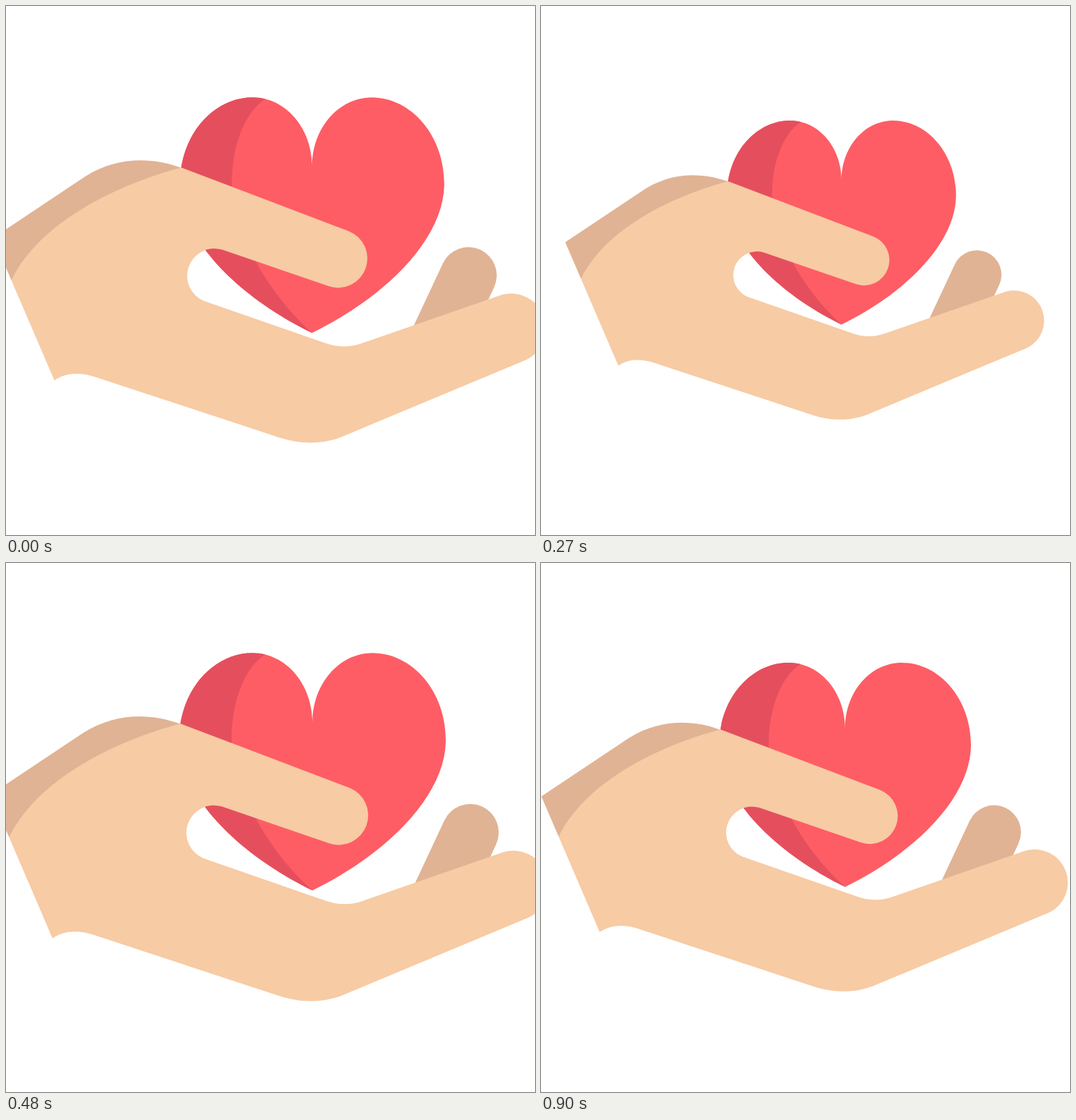
Write an HTML page that moves like this. It is 748 by 748 pixels and loops after 0.93 s.

```html
<!DOCTYPE html>
<html lang="en">
<head>
<meta charset="utf-8">
<title>Beating heart in a hand</title>
<style>
  html, body { margin: 0; width: 100%; height: 100%; overflow: hidden; background: #fff; }
  svg { display: block; width: 100%; height: 100%; }
</style>
</head>
<body>
<svg viewBox="0 0 748 748">
  <g id="icon">
    <!-- heart and its shaded side -->
    <path fill="#fe5d65" d="M430 234C430 182 466 141 510 141C564 141 608 193 608 257C608 330 532 408 430 458
      C328 408 252 330 252 257C252 193 296 141 350 141C394 141 430 182 430 234Z"/>
    <path fill="#e54f5d" d="M367 143C340 160 322 205 322 257C322 308 360 395 430 458
      C328 408 252 330 252 257C252 193 296 141 350 141Q359 141 367 143Z"/>
    <!-- wrist shade and little finger -->
    <path fill="#e0b394" d="M.5 330L125 247C165 222 212 220 254 236L25 387Z
      M567 448L606 364.7A38 38 0 0 1 675.2 396.4L655 440Z"/>
    <!-- palm, thumb and fingers -->
    <path fill="#f7cba4" d="M254 235.4L479.6 321.1A39.5 39.5 0 0 1 452.6 395.3L309 346
      A36.7 36.7 0 0 0 285 415.3L446 471.2C464 478 482 478 500 471L685.7 406.6
      A47 47 0 0 1 719 494L470 598C443 608.5 413 608 386 599L137 517C118 511 98 511 83 522L25 387
      C70 295 200 249 254 235.4Z"/>
  </g>
</svg>
<script>
const icon = document.getElementById('icon');
const LOOP = 930, STEP = 30, BEAT = 900;
// [progress, scale]
const keys = [[0, 1.05], [.05, 1.25], [.39, .9], [.45, 1.15], [.6, 1.05], [1, 1]];

const bezier = (a, b, u) => 3 * a * u * (1 - u) ** 2 + 3 * b * u * u * (1 - u) + u ** 3;

// cubic-bezier(.215, .61, .355, 1)
function ease(x) {
  let lo = 0, hi = 1;
  for (let i = 0; i < 24; i++) {
    const mid = (lo + hi) / 2;
    if (bezier(.215, .355, mid) < x) lo = mid; else hi = mid;
  }
  return bezier(.61, 1, (lo + hi) / 2);
}

function scaleAt(p) {
  const i = Math.max(1, keys.findIndex(k => p <= k[0]));
  const [p0, s0] = keys[i - 1], [p1, s1] = keys[i];
  return s0 + (s1 - s0) * ease((p - p0) / (p1 - p0));
}

function draw() {
  const t = Math.floor(performance.now() % LOOP / STEP) * STEP;
  const s = scaleAt(t / BEAT);
  icon.setAttribute('transform', `translate(374 374) scale(${s}) translate(-374 -374)`);
  requestAnimationFrame(draw);
}
draw();
</script>
</body>
</html>
```
